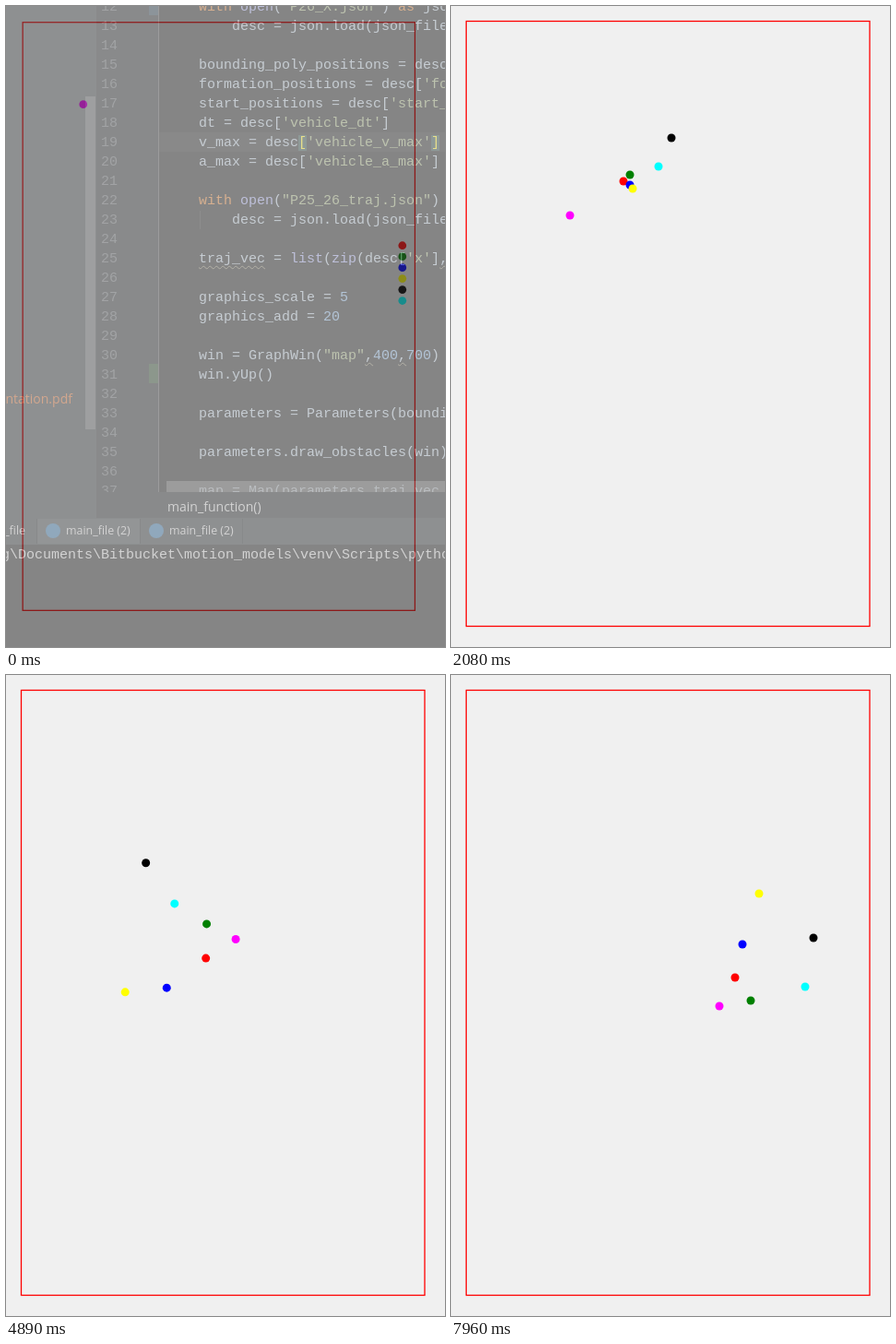
Recreate the animation shown at these times as an HTML page. Size 476 by 695 pixels, loop 8 s.

```html
<!DOCTYPE html>
<html lang="en">
<head>
<meta charset="utf-8">
<title>Formation flight</title>
<style>
  html, body { margin: 0; width: 100%; height: 100%; overflow: hidden; background: #f0f0f0; }
  #ide, #map { position: absolute; left: 0; top: 0; width: 476px; height: 695px; overflow: hidden; }
  #ide { background: #2b2b2b; color: #bbb; font: 14px "Open Sans", "Noto Sans", sans-serif; }
  #ide div, #ide i { position: absolute; white-space: pre; font-style: normal; line-height: 20px; }
  #ide .mono { font: 15px/21px "Liberation Mono", monospace; }
  #code { left: 209px; top: -9px; color: #a3afba; }
  #lines { left: 98px; width: 23px; top: -9px; text-align: right; color: #606366; }
  .key { color: #c27a3f; }
  .str { color: #929d78; }
  .num { color: #7f9fc0; }
  .builtin { color: #9498c8; }
  .brace { color: #e0d235; background: #3b514d; }
  .wavy { text-decoration: underline wavy #807b68 1px; text-underline-offset: 3px; }
</style>
</head>
<body>
<div id="ide"></div>
<svg id="map" viewBox="0 0 476 695">
  <rect width="476" height="695" fill="#f0f0f0"/>
  <g id="scene">
    <rect x="16.5" y="16.5" width="437.5" height="656" fill="none" stroke="#f00" stroke-width="1.3"/>
  </g>
</svg>
<script>
const ide = document.getElementById('ide');
const map = document.getElementById('map');
const scene = document.getElementById('scene');

// Editor behind the map window
const source = `with open("P26_X.json") as json_file:
    desc = json.load(json_file)

bounding_poly_positions = desc['bounding_poly']
formation_positions = desc['formation_positions']
start_positions = desc['start_positions']
dt = desc['vehicle_dt']
v_max = desc['vehicle_v_max']
a_max = desc['vehicle_a_max']

with open("P25_26_traj.json") as json_file:
    desc = json.load(json_file)

traj_vec = list(zip(desc['x'],desc['y']))

graphics_scale = 5
graphics_add = 20

win = GraphWin("map",400,700)
win.yUp()

parameters = Parameters(bounding_poly_positions)

parameters.draw_obstacles(win)

map = Map(parameters.traj_vec,win)`;

const tokens = /(?<str>"[^"]*"|'[^']*')|\b(?<key>with|as)\b|\b(?<builtin>open|list|zip)\b|\b(?<num>\d+)\b|(?<wavy>^traj_vec|,)/gm;
const paint = text => text
  .replace(tokens, (...match) => {
    const [kind, value] = Object.entries(match.at(-1)).find(([, v]) => v);
    return `<span class="${kind}">${value}</span>`;
  })
  .replace(/(v_max = desc)\[(.*)\]/, '$1<span class="brace">[</span>$2<span class="brace">]</span>');

const box = (x, y, w, h, color, radius = 0) =>
  `<i style="left:${x}px;top:${y}px;width:${w}px;height:${h}px;background:${color};border-radius:${radius}px"></i>`;
const label = (side, y, text, size = 14, color = '#bbb') =>
  `<div style="${side}px;top:${y}px;font-size:${size}px;color:${color}">${text}</div>`;
const tab = x => box(x, 556, 1, 27, '#303234') + box(x + 10, 561, 16, 16, '#3f6c90', 8) +
  label(`left:${x + 32}`, 559, 'main_file (2)', 12.4);

ide.innerHTML =
  box(0, 0, 98, 556, '#3c3f41') + box(86, 98, 11, 361, '#595b5d') +
  box(98, 0, 67, 527, '#313335') + box(165, 0, 1, 527, '#555') +
  box(166, 137, 310, 21, '#323232') +
  box(155, 0, 10, 10, '#374752') + box(155, 388, 10, 21, '#384c38') +
  `<div id="lines" class="mono">${Array.from({ length: 26 }, (_, i) => i + 12).join('\n')}</div>` +
  `<div id="code" class="mono">${paint(source)}</div>` +
  box(210, 222, 1, 20, '#3b3b3b') + box(174, 515, 302, 12, 'rgba(120,120,120,.55)') +
  box(98, 527, 378, 29, '#313335') + label('left:175', 533, 'main_function()') +
  label('right:404', 416, 'documentation.pdf', 14, '#b9693c') +
  box(0, 555, 476, 29, '#3c3f41') + box(33, 556, 112, 27, '#45484a') +
  label('right:455', 559, 'main_file', 12.4) + tab(33) + tab(145) + box(256, 556, 1, 27, '#303234') +
  box(0, 584, 476, 111, '#2b2b2b') +
  '<div class="mono" style="left:-5px;top:585px">g\\Documents\\Bitbucket\\motion_models\\venv\\Scripts\\python.exe</div>';

// The simulation redraws about every 78 ms, with one stall around 4.2 s
function snap(t) {
  if (t < 60) return 0;
  const [base, step] = t < 4310 ? [40.5, 78.08] : [5102.5, 78.6];
  const k = Math.floor((t - base) / step);
  return base + step * (t < 4310 ? Math.min(k, 52) : k);
}

// The flock starts in a column, turns wide to the left, then forms a V behind its leader
const column = i => [440, 265.5 + 12.3 * i];
const leftArm = rank => [298 - 29.5 * rank, 305.5 - 33 * rank];
const rightArm = rank => [300 - 33.5 * rank, 274 + 29.5 * rank];
const wideTurn = (from, to, swing) => from.map((v, axis) => v + (to[axis] - v) * .65 + swing[axis]);

const times = [0, 2080, 3410, 4120, 5660, 6930, 7960].map(snap);
const followers = [
  ['red', rightArm(1), [187, 190], [168, 299], [341, 289], [308, 328]],
  ['green', leftArm(1), [194, 183], [171, 261], [365, 284], [325, 353]],
  ['blue', rightArm(2), [194, 194], [116, 325], [279, 265], [316, 292]],
  ['yellow', rightArm(3), [197, 198], [61, 305], [234, 292], [334, 237]],
  ['black', leftArm(3), [239, 143], [106, 193], [315, 194], [393, 285]],
  ['cyan', leftArm(2), [225, 174], [136, 248], [344, 232], [384, 338]],
].map((dot, i) => [...dot, column(i), [-48, -17]]);
const leader = ['magenta', [298, 292], [129, 227], [200, 284], [338, 323], [291, 359], [84, 108], [3, 14]];

const dots = [...followers, leader].map(([color, vee, gather, turned, bend, end, start, swing]) => {
  const node = document.createElementNS('http://www.w3.org/2000/svg', 'circle');
  node.setAttribute('r', 4.5);
  node.setAttribute('fill', color);
  scene.append(node);
  return { node, path: [start, gather, wideTurn(gather, turned, swing), turned, vee, bend, end] };
});

// Smooth curve through the way points, with tangents from the neighbours
function at(path, axis, t) {
  const last = times.length - 1;
  let i = 0;
  while (i < last - 1 && t >= times[i + 1]) i++;
  const slope = n => {
    const a = Math.max(n - 1, 0), b = Math.min(n + 1, last);
    return (path[b][axis] - path[a][axis]) / (times[b] - times[a]);
  };
  const span = times[i + 1] - times[i];
  const u = Math.min((t - times[i]) / span, 1), v = 1 - u;
  return path[i][axis] * (1 + 2 * u) * v * v + path[i + 1][axis] * u * u * (3 - 2 * u)
    + span * u * v * (slope(i) * v - slope(i + 1) * u);
}

function draw(now) {
  const t = snap(now % 8000);
  // The window fades in and grows slightly as it opens
  const closed = t < 190 ? Math.exp(-t / 49) : 0;
  map.style.opacity = 1 - .54 * closed;
  scene.setAttribute('transform', `translate(75 60) scale(${1 - .028 * closed}) translate(-75 -60)`);
  for (const { node, path } of dots) {
    node.setAttribute('cx', at(path, 0, t));
    node.setAttribute('cy', at(path, 1, t));
  }
}

const start = performance.now();
function loop() {
  draw(performance.now() - start);
  requestAnimationFrame(loop);
}
loop();
</script>
</body>
</html>
```
